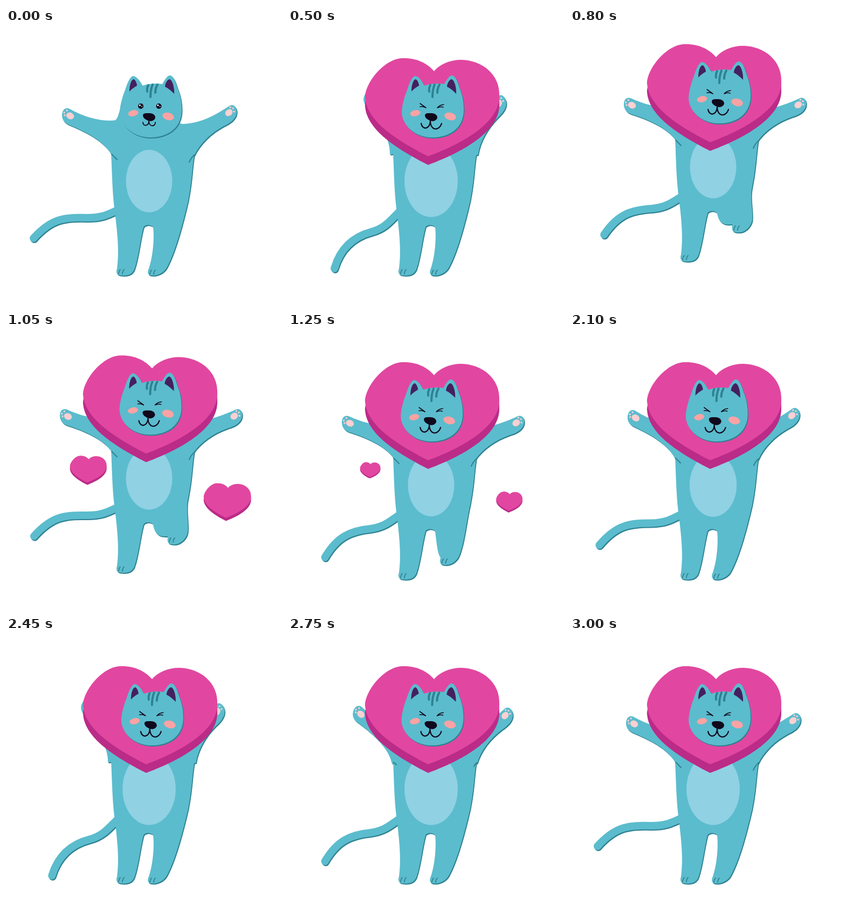
Write an HTML page with a canvas that moves like this. It is 512 px wide and 512 px high and loops after 3.05 s.

```html
<!DOCTYPE html>
<html>
<head>
<meta charset="utf-8">
<style>
html, body { margin: 0; width: 100%; height: 100%; overflow: hidden; background: #fff; }
canvas { display: block; }
</style>
</head>
<body>
<canvas id="stage" width="512" height="512"></canvas>
<script>
const ctx = document.getElementById('stage').getContext('2d');
const LOOP = 3050, STEP = 50;
const BLUE = '#5bbccd', SHADE = '#2e8291', INK = '#10081c';
const PINK = '#e147a0', PLUM = '#bb2b88', BLUSH = '#fba3a4', PAD = '#fcd0d2';

const shape = d => new Path2D(d);
const torso = shape('M195,232C197,275 197,310 203,350C207,385 210,415 206,446C203,455 206,459 215,459C226,460 234,457 238,448C246,425 249,392 255,370C257,364 270,364 273,370L290,372L338,320C345,285 345,262 349,236L337,190L328,178L212,150C208,160 208,170 200,172Z');
const leftArm = shape('M206,171C180,174 150,168 118,150C110,146 104,152 104,162C104,172 110,177 118,180C150,193 185,212 197,238L230,215L225,180Z');
const rightArm = shape('M329,178C365,176 390,160 412,146C422,138 429,147 428,157C427,169 415,177 404,182C380,195 360,214 349,237L320,235L300,190Z');
const head = shape('M211,155C212,140 217,125 221,115C225,102 230,90 236,89C243,90 248,98 253,107C265,103 278,102 290,104C294,97 299,88 304,88C313,89 316,106 320,116C325,130 326,142 326,152C326,185 300,203 268,203C235,203 211,180 211,155Z');
const ears = shape('M229,118C229,106 232,96 237,95C241,97 243,104 243,107C238,110 233,113 229,118ZM312,122C313,110 308,95 303,95C298,97 295,104 295,109C302,112 308,118 312,122Z');
const stripes = shape('M264,106Q261,111 262,118M272,105Q268,114 268,128M281,105Q277,112 277,120');
const nose = shape('M254,162C254,157 262,158 266,158C273,158 277,162 277,166C276,172 269,174 264,172C259,170 254,167 254,162Z');
const calmMouth = shape('M254,175C254,183 265,183 265,172C265,184 277,184 277,175');
const wideMouth = shape('M247,177C249,190 264,188 264,172C264,192 281,191 285,177');
const shutEyes = shape('M245,140L256,148Q251,145 245,146M289,142Q281,143 277,148Q283,145 288,147');
const heart = shape('M271,80C258,65 238,55 212,56C178,57 142,103 143,130C146,168 190,203 260,238C335,210 392,172 392,127C394,86 360,60 322,59C300,59 282,67 271,80Z');
const toes = shape('M270,449Q267,452 267,457M277,449Q274,452 274,457');

// Control points for the two extreme poses
const legDown = [338,320, 330,355, 315,415, 298,445, 292,455, 280,460, 270,459, 262,459, 262,452, 265,446, 270,432, 276,400, 273,370];
const legUp = [338,320, 333,340, 340,365, 338,382, 336,396, 322,407, 311,405, 300,405, 300,400, 301,390, 285,392, 276,388, 273,370];
const tailUp = [206,338, 185,348, 175,352, 150,352, 110,351, 85,352, 51,390];
const tailDown = [206,341, 190,357, 180,371, 155,378, 125,386, 98,405, 86,446];

function blend(a, b, k) {
  const p = a.map((v, i) => v + (b[i] - v) * k);
  const path = new Path2D();
  path.moveTo(p[0], p[1]);
  for (let i = 2; i < p.length; i += 6) path.bezierCurveTo(...p.slice(i, i + 6));
  return path;
}

// Eased value from [time, value] keys
function track(t, keys) {
  let i = 1;
  while (i < keys.length - 1 && t > keys[i][0]) i++;
  const [t0, a] = keys[i - 1], [t1, b] = keys[i];
  const u = Math.min(1, Math.max(0, (t - t0) / (t1 - t0)));
  return a + (b - a) * (1 - Math.cos(Math.PI * u)) / 2;
}

function fill(path, color) {
  ctx.fillStyle = color;
  ctx.fill(path);
}

function line(path, color, width) {
  ctx.strokeStyle = color;
  ctx.lineWidth = width;
  ctx.stroke(path);
}

function oval(x, y, rx, ry, angle, color) {
  ctx.fillStyle = color;
  ctx.beginPath();
  ctx.ellipse(x, y, rx, ry, angle, 0, 7);
  ctx.fill();
}

function at(dx, dy, draw) {
  ctx.save();
  ctx.translate(dx, dy);
  draw();
  ctx.restore();
}

function turned(x, y, degrees, draw) {
  ctx.save();
  ctx.translate(x, y);
  ctx.rotate(degrees * Math.PI / 180);
  ctx.translate(-x, -y);
  draw();
  ctx.restore();
}

function drawHeart(x, y, scale) {
  if (scale <= 0) return;
  ctx.save();
  ctx.translate(x, y);
  ctx.scale(scale, scale);
  ctx.translate(-267, -155);
  at(0, 16, () => fill(heart, PLUM));
  fill(heart, PINK);
  ctx.restore();
}

function drawBody(t) {
  const lift = track(t, [[0, 0], [500, 1], [750, 0], [1250, 0], [1500, 1], [2000, 0], [2500, 1], [3000, 0]]);
  const wide = track(t, [[500, 0], [750, 1], [1250, 1], [1500, 0]]);
  const kick = track(t, [[500, 0], [750, 1], [1000, 1], [1500, 0]]);
  const swing = (1 - Math.cos(t * Math.PI / 500)) / 2;
  const leg = blend(legDown, legUp, kick);
  leg.lineTo(270, 330);
  leg.closePath();
  const tail = blend(tailUp, tailDown, swing);
  const onLeft = draw => turned(200, 220, 28 * lift - 4.3 * wide, draw);
  const onRight = draw => turned(345, 225, 9 * wide - 17 * lift, draw);

  const silhouette = color => {
    line(tail, color, 14);
    onLeft(() => fill(leftArm, color));
    onRight(() => fill(rightArm, color));
    fill(torso, color);
    fill(leg, color);
  };
  at(1.5, 2, () => silhouette(SHADE));
  silhouette(BLUE);

  const crease = 10 * (1 - lift);
  if (crease > 0.5) {
    line(shape(`M196,234l${crease},${crease}M350,235q${-crease * 0.7},${crease * 0.6} ${-crease},${crease * 1.4}`), SHADE, 2);
  }
  onLeft(() => {
    oval(119, 163, 7.5, 6, 0.5, PAD);
    for (const [x, y] of [[109, 162], [108, 157], [113, 153]]) oval(x, y, 1.7, 1.7, 0, PAD);
  });
  onRight(() => {
    oval(413.5, 157, 7.3, 6, -0.7, PAD);
    for (const [x, y] of [[416, 147], [421, 149], [423, 155]]) oval(x, y, 1.7, 1.7, 0, PAD);
  });

  const grow = track(t, [[0, 1], [500, 1.15], [750, 1], [2000, 1], [2500, 1.15]]);
  oval(265.5, 284, 43 * grow, 58 * grow, 0, '#90d1e4');
  at(-58, -1, () => line(toes, SHADE, 1.7));
  at(37 * kick, -56 * kick, () => line(toes, SHADE, 1.7));
}

function drawHead(happy) {
  at(1.5, 2, () => fill(head, SHADE));
  fill(head, BLUE);
  fill(ears, '#45205f');
  line(stripes, SHADE, 4);
  oval(236, 158, 9.5, 5.7, -0.2, BLUSH);
  oval(301, 164, 11, 7, 0.25, BLUSH);
  fill(nose, INK);
  line(happy ? wideMouth : calmMouth, INK, happy ? 2.2 : 1.8);
  if (happy) {
    line(shutEyes, INK, 1.6);
  } else {
    for (const x of [250, 283.5]) {
      oval(x, 145, 5, 5, 0, INK);
      oval(x - 1.7, 143.3, 1.5, 1.5, 0, '#fff');
      oval(x + 2, 145.5, 0.9, 0.9, 0, '#fff');
    }
  }
}

function draw(t) {
  ctx.fillStyle = '#fff';
  ctx.fillRect(0, 0, 512, 512);
  ctx.lineCap = ctx.lineJoin = 'round';

  const jump = 26 * Math.max(0, 1 - Math.abs((t - 800) / 300) ** 3.6);
  const sway = t < 800
    ? track(t, [[500, 0], [800, 9]])
    : 2.8 + 6.2 * Math.cos((t - 800) / 2200 * 6 * Math.PI);

  at(0, -jump, () => {
    drawBody(t);
    drawHeart(267, 155, track(t, [[100, 0], [450, 1]]));
    at(sway, 0, () => drawHead(t >= 200));
  });

  const pop = track(t, [[850, 0], [1050, 1.8], [1100, 1.8], [1400, 0.2], [1450, 0]]);
  drawHeart(152.5, 256.5, 0.152 * pop);
  drawHeart(410.5, 315.5, 0.196 * pop);
}

const start = performance.now();
function tick() {
  const t = (performance.now() - start) % LOOP;
  draw(Math.floor(t / STEP) * STEP);
  requestAnimationFrame(tick);
}
tick();
</script>
</body>
</html>
```
